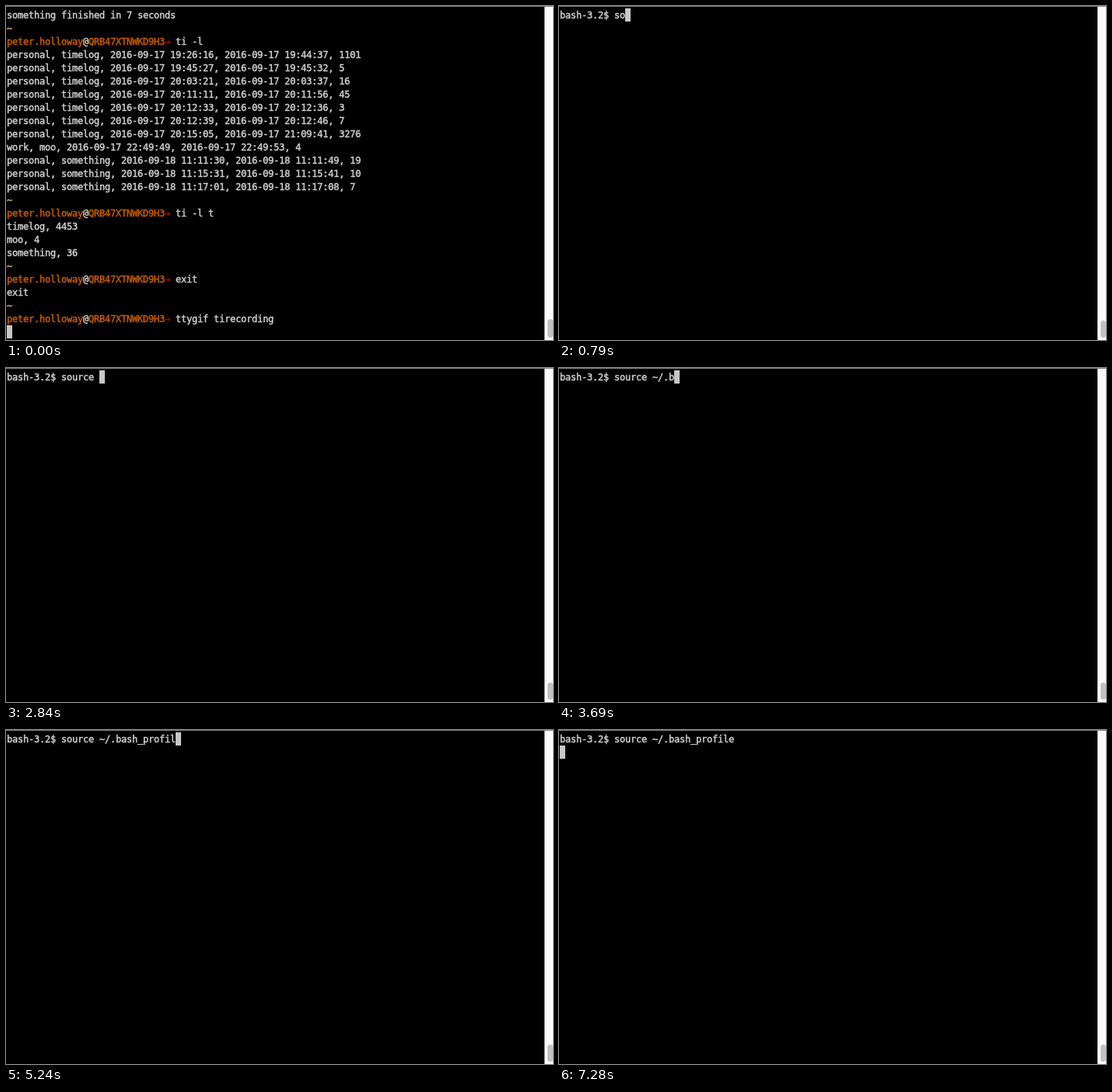
Write an HTML page that moves like this. It is 703 px wide and 430 px high and loops after 8 s.

```html
<!DOCTYPE html>
<html lang="en">
<head>
<meta charset="utf-8">
<title>Terminal session</title>
<style>
  html, body { margin: 0; width: 100%; height: 100%; overflow: hidden; background: #000; }
  svg { display: block; width: 703px; height: 430px; }
  text {
    font: 12px "DejaVu Sans Mono", monospace;
    letter-spacing: calc(7px - .60205em);
    white-space: pre;
    color: #d0d0d0;
  }
  text, tspan { fill: currentColor; stroke: currentColor; stroke-width: .45px; }
  .name { color: #c75b00; }
  .arrow { color: #a80000; }
  .path { color: #f0b050; }
</style>
</head>
<body>
<svg viewBox="0 0 703 430">
  <rect width="703" height="430"/>
  <rect x="692" width="11" height="430" fill="#fafafa"/>
  <rect x="692" width="1" height="430" fill="#e8e8e8"/>
  <rect width="703" height="1" fill="#808080"/>
  <rect id="thumb" x="696" width="7" rx="3.5" fill="#c1c1c1"/>
  <g id="screen"></g>
  <rect id="cursor" width="7" height="17" fill="#c7c7c7"/>
</svg>
<script>
const CELL = 7, ROW = 17, LEFT = 1, TOP = 3, BASELINE = 13, LOOP = 8000;
const screenEl = document.getElementById('screen');
const cursor = document.getElementById('cursor');
const thumb = document.getElementById('thumb');

const span = (cls, text) => `<tspan class="${cls}">${text}</tspan>`;
const path = span('path', '~');
const prompt = command =>
  `${path}\n${span('name', 'peter.holloway')}@${span('name', 'QRB47XTNWKD9H3')}` +
  `${span('arrow', '→')} ${command}`;
const entry = (task, day, from, to, seconds) =>
  `${task}, 2016-09-${day} ${from}, 2016-09-${day} ${to}, ${seconds}`;

const history = [
  'something finished in 7 seconds',
  prompt('ti -l'),
  entry('personal, timelog', 17, '19:26:16', '19:44:37', 1101),
  entry('personal, timelog', 17, '19:45:27', '19:45:32', 5),
  entry('personal, timelog', 17, '20:03:21', '20:03:37', 16),
  entry('personal, timelog', 17, '20:11:11', '20:11:56', 45),
  entry('personal, timelog', 17, '20:12:33', '20:12:36', 3),
  entry('personal, timelog', 17, '20:12:39', '20:12:46', 7),
  entry('personal, timelog', 17, '20:15:05', '21:09:41', 3276),
  entry('work, moo', 17, '22:49:49', '22:49:53', 4),
  entry('personal, something', 18, '11:11:30', '11:11:49', 19),
  entry('personal, something', 18, '11:15:31', '11:15:41', 10),
  entry('personal, something', 18, '11:17:01', '11:17:08', 7),
  prompt('ti -l t'),
  'timelog, 4453',
  'moo, 4',
  'something, 36',
  prompt('exit'),
  'exit',
  prompt('ttygif tirecording'),
  ''
].join('\n');

// Each step: start time, then the text appended; '\b' erases one character.
const keys = [
  [650, 'bash-3.2$ '],
  [790, 'so'], [920, 'ur'], [1080, 'ce'], [1160, ' '],
  [1980, '`'], [2840, '\b'],
  [3160, '~/'], [3360, '.'],
  [3690, 'b'], [3780, 'a'], [3870, 's'], [4110, 'h_'],
  [4540, 'p'], [4700, 'ro'], [4940, 'f'], [5050, 'i'], [5240, 'l'],
  [6820, 'e'], [7280, '\n']
];

const typedAt = time => keys
  .filter(([start]) => start <= time)
  .reduce((text, [, key]) => key === '\b' ? text.slice(0, -1) : text + key, '');

let shown = null;

function draw(time) {
  const cleared = time >= 80;
  const content = cleared ? typedAt(time) : history;
  if (content === shown) return;
  shown = content;

  const lines = content.split('\n');
  const last = lines.length - 1;
  screenEl.innerHTML = lines.map((line, row) =>
    `<text x="${LEFT}" y="${TOP + BASELINE + row * ROW}">${line}</text>`).join('');
  cursor.setAttribute('x', LEFT + lines[last].length * CELL);
  cursor.setAttribute('y', TOP + last * ROW);
  thumb.setAttribute('y', cleared ? 405 : 403);
  thumb.setAttribute('height', cleared ? 22 : 24);
}

const start = performance.now();
function tick() {
  draw((performance.now() - start) % LOOP);
  requestAnimationFrame(tick);
}
tick();
</script>
</body>
</html>
```
